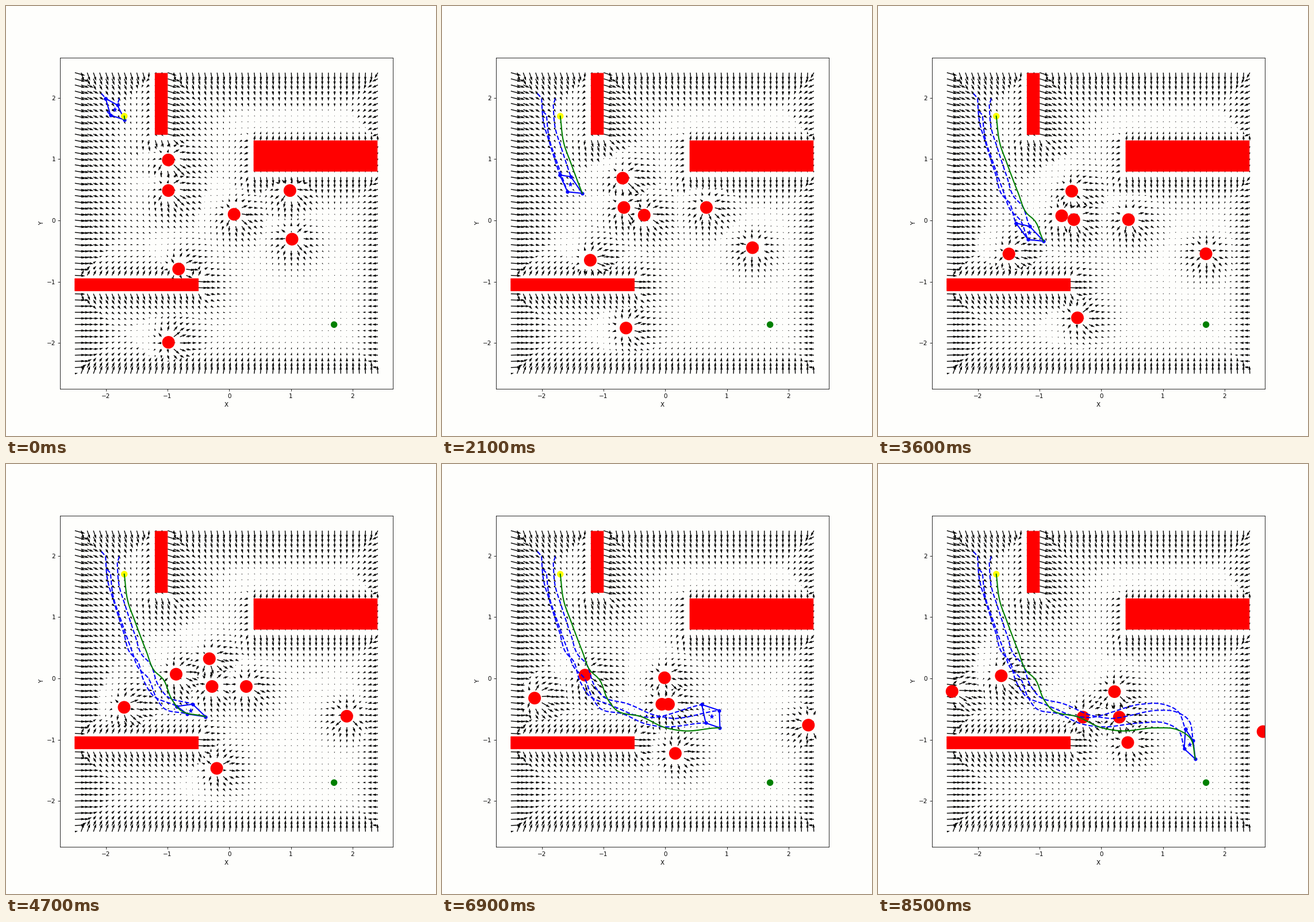
These frames come from a looping animation (748x748 px, 8.6 s). A matplotlib script:

```python
import numpy as np
import matplotlib.pyplot as plt
from matplotlib.animation import FuncAnimation
from matplotlib.patches import Ellipse, Rectangle

FRAMES, INTERVAL = 86, 100
CELLS, SKIP = 500, 10            # world grid and arrow spacing, in cells
REPULSE, ATTRACT = 300, 1 / 700
DISC_RADIUS = 11                 # cells
PAPER = "#fefefc"
GOAL, START = (1.7, -1.7), (-1.7, 1.7)
SHOWN = 2.4                      # walls are drawn up to here

# left, bottom, right, top in metres
WALLS = [(-1.2, 1.4, -1.0, 2.5), (0.4, 0.8, 2.5, 1.3), (-2.5, -1.15, -0.5, -0.95)]

# moving discs: start point and heading
DISC_START = np.array([(-1, 1), (-1, 0.5), (0.1, 0.1), (1, 0.5),
                       (1, -0.3), (-0.8, -0.8), (-1, -2)], float)
HEADING = np.array([(1, -1), (8, -7), (-30, -1), (-8, -7),
                    (20, -7), (-11, 4), (3, 2)], float)
DISC_STEP = 0.02 * HEADING / np.linalg.norm(HEADING, axis=1)[:, None]

# key points of the leader's route, run through at constant speed
ROUTE = [START, (-1.64, 1.25), (-1.53, 0.94), (-1.34, 0.435), (-1.21, 0.12),
         (-1.08, 0), (-0.925, -0.35), (-0.79, -0.52), (-0.384, -0.625),
         (-0.01, -0.8), (0.29, -0.855), (0.888, -0.807), (1.23, -0.835),
         (1.44, -0.967), (1.526, -1.314)]

# followers' places relative to the leader at key steps: rear, right, left
KEY_STEPS = [0, 1, 22, 37, 48, 60, 70, 86]
FORMATION = np.array([
    [(-0.37, 0.37), (-0.08, 0.29), (-0.28, 0.08)],
    [(-0.31, 0.35), (-0.12, 0.24), (-0.23, 0.075)],
    [(-0.365, 0.30), (-0.185, 0.27), (-0.24, 0.025)],
    [(-0.45, 0.295), (-0.225, 0.24), (-0.25, 0.025)],
    [(-0.465, 0.17), (-0.21, 0.205), (-0.30, 0.045)],
    [(-0.46, 0.215), (-0.135, 0.20), (-0.305, 0.065)],
    [(-0.295, 0.38), (-0.01, 0.285), (-0.23, 0.08)],
    [(-0.16, 0.485), (-0.035, 0.30), (-0.18, 0.165)],
])


def interp2(at, t, pts):
    return np.column_stack([np.interp(at, t, pts[:, k]) for k in (0, 1)])


def smooth_route(points):
    """Evenly spaced positions, one per step, on a Hermite curve."""
    pts = np.array(points, float)
    t = np.r_[0, np.cumsum(np.hypot(*np.diff(pts, axis=0).T))]
    slope = np.gradient(pts, t, axis=0)
    u = np.linspace(0, t[-1], 1500)
    i = np.clip(np.searchsorted(t, u, side="right") - 1, 0, len(t) - 2)
    h = (t[i + 1] - t[i])[:, None]
    s = (u - t[i])[:, None] / h
    curve = ((1 + 2 * s) * (1 - s) ** 2 * pts[i] + s ** 2 * (3 - 2 * s) * pts[i + 1]
             + h * s * (1 - s) * ((1 - s) * slope[i] - s * slope[i + 1]))
    arc = np.r_[0, np.cumsum(np.hypot(*np.diff(curve, axis=0).T))]
    return interp2(np.linspace(0, arc[-1], FRAMES + 1), arc, curve)


def to_cell(metres):
    return np.asarray(metres) * 100 + CELLS / 2


def potential(i, j, discs):
    last = CELLS - 1
    d = np.minimum(np.minimum(i, last - i), np.minimum(j, last - j)).astype(float)
    for wall in WALLS:
        x0, y0, x1, y1 = np.round(to_cell(wall)) - 1
        dx = np.maximum(np.maximum(x0 - i, i - x1), 0)
        dy = np.maximum(np.maximum(y0 - j, j - y1), 0)
        d = np.minimum(d, np.hypot(dx, dy))
    for x, y in to_cell(discs):
        if x - DISC_RADIUS < last:
            d = np.minimum(d, np.maximum(np.hypot(i - x, j - y) - DISC_RADIUS, 0))
    d = d / 100 + 1
    push = np.where(d > 2, 0, REPULSE * (1 / d - 1 / 2) ** 2)
    gx, gy = to_cell(GOAL)
    return push + ATTRACT * ((i - gx) ** 2 + (j - gy) ** 2)


cells = np.arange(0, CELLS, SKIP)
I, J = np.meshgrid(cells, cells)
I0, I1 = np.maximum(I - 1, 0), I + 1
J0, J1 = np.maximum(J - 1, 0), J + 1


def field(discs):
    u = (potential(I0, J, discs) - potential(I1, J, discs)) / (I1 - I0)
    v = (potential(I, J0, discs) - potential(I, J1, discs)) / (J1 - J0)
    return u, v


leader = smooth_route(ROUTE)
steps = np.arange(FRAMES + 1)
rear, right, left = (leader + interp2(steps, KEY_STEPS, FORMATION[:, k])
                     for k in range(3))

fig, ax = plt.subplots(figsize=(10, 10), dpi=74.8, facecolor=PAPER)
ax.set_facecolor(PAPER)
axis = np.linspace(-2.5, 2.5, CELLS)[::SKIP]
margin = 0.05 * (axis[-1] - axis[0])
limits = axis[0] - margin, axis[-1] + margin
ax.set(xlim=limits, ylim=limits)
ax.set_xlabel("X", labelpad=5)
ax.set_ylabel("Y")
ax.tick_params(axis="x", pad=4.2)


def add_dot(xy, size, color, z=1):
    """Round dot, its size in pixels."""
    unit = (limits[1] - limits[0]) / np.array([ax.bbox.width, ax.bbox.height])
    return ax.add_patch(Ellipse(xy, *(size * unit), color=color, lw=0, zorder=z))


arrows = ax.quiver(axis, axis, *field(DISC_START))
for x0, y0, x1, y1 in WALLS:
    ax.add_patch(Rectangle((x0, y0), min(x1, SHOWN) - x0, min(y1, SHOWN) - y0,
                           color="red", snap=False))
balls = [add_dot(p, 22, "red") for p in DISC_START]
trails = [ax.plot([], [], "--", color="blue", lw=2)[0] for _ in range(3)]
hull, = ax.plot([], [], "-o", color="blue", lw=2, ms=5)
star, = ax.plot([], [], "*", color="blue", ms=7)
add_dot(START, 11.5, "yellow", 3)
add_dot(GOAL, 11.5, "green", 3)
route, = ax.plot([], [], color="green", lw=2, zorder=4)


def update(frame):
    step = frame + 1
    discs = DISC_START + DISC_STEP * step
    u, v = field(discs)
    arrows.set_UVC(u, v)
    arrows.scale = 1.8 * len(cells) * np.hypot(u, v).mean()
    for ball, place in zip(balls, discs):
        ball.set_center(place)
    for line, track in zip(trails, (rear, right, left)):
        line.set_data(*track[:step + 1].T)
    route.set_data(*leader[:step + 1].T)
    team = np.array([track[step] for track in (rear, right, leader, left)])
    hull.set_data(*np.vstack([team, team[:1]]).T)
    star.set_data(*team.mean(axis=0)[:, None])
    return [arrows, *balls, *trails, hull, star, route]


anim = FuncAnimation(fig, update, frames=FRAMES, interval=INTERVAL,
                     repeat=True, repeat_delay=0)
plt.show()
```
